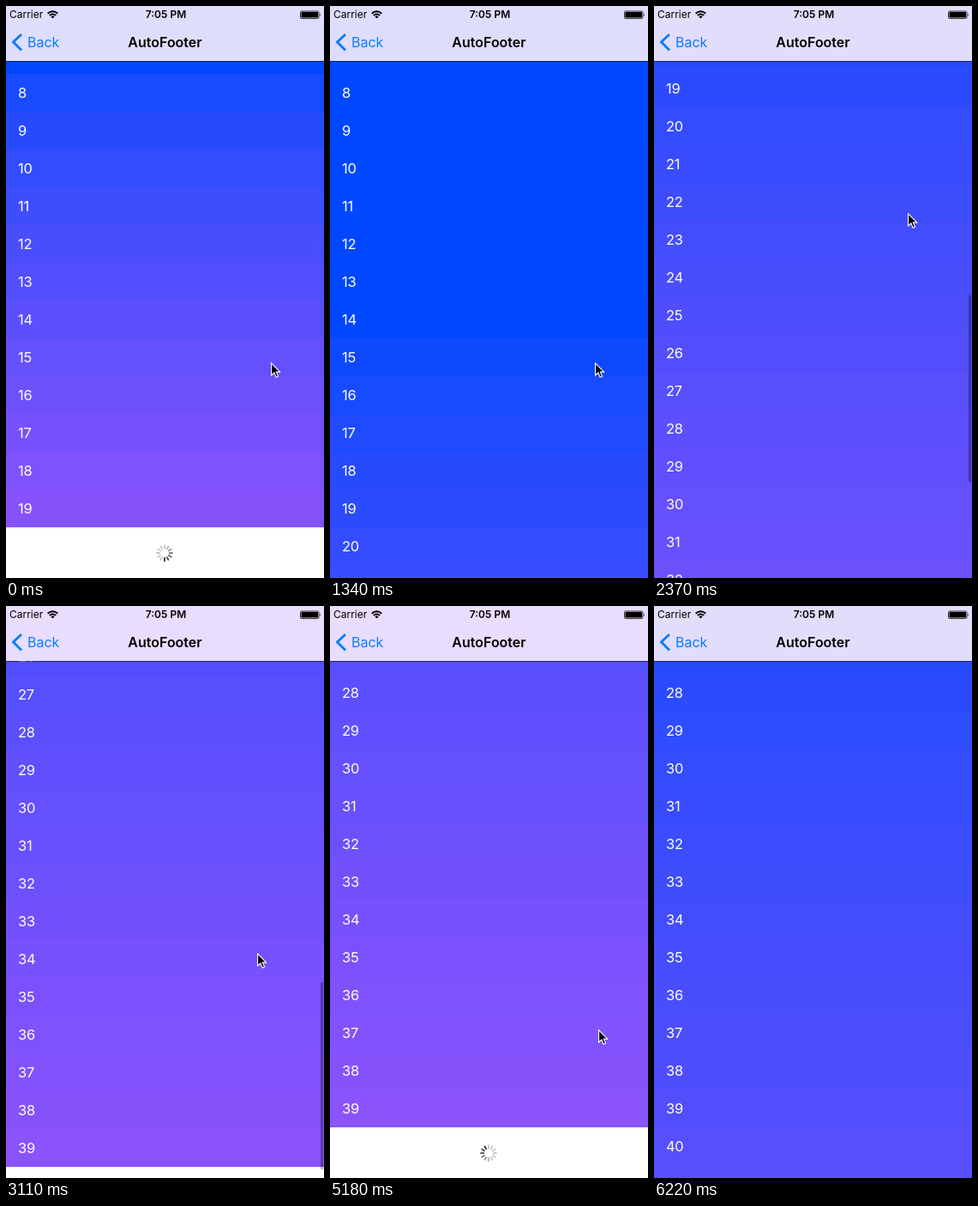
An HTML page for the animation above (6.81 s loop, 371 px wide and 666 px high).

```html
<!DOCTYPE html>
<html lang="en">
<head>
<meta charset="utf-8">
<title>AutoFooter</title>
<style>
  html, body { margin: 0; width: 100%; height: 100%; overflow: hidden; background: #fff; }
  body { position: relative; font-family: Inter, "Liberation Sans", sans-serif; }
  #stage { position: absolute; left: 0; top: 0; width: 371px; height: 666px; overflow: hidden; background: #fff; }
  #list { position: absolute; left: 0; top: 0; width: 100%; }
  .row { height: 44px; line-height: 44px; padding-left: 14px; color: #fff; font-size: 16.5px; letter-spacing: -.3px; }
  #footer { position: relative; height: 60px; background: #fff; }
  #footer svg { position: absolute; left: 175px; top: 20px; }
  #bar { position: absolute; left: 367px; top: 0; width: 3px; border-radius: 2px; background: #000; }
  #nav { position: absolute; left: 0; top: 0; width: 100%; height: 64px; border-bottom: 1px solid rgba(0, 0, 30, .6); background-clip: padding-box; }
  #nav span { position: absolute; white-space: nowrap; line-height: 20px; }
  #nav svg { position: absolute; left: 0; top: 0; }
  .status { top: 0; font-size: 12px; }
  .title { top: 32px; font-size: 16px; }
  .mid { left: 0; width: 371px; text-align: center; font-weight: 600; color: #000; }
  #cursor { position: absolute; left: 0; top: 0; overflow: visible; }
</style>
</head>
<body>
<div id="stage">
  <div id="list">
    <div id="footer">
      <svg width="20" height="20" viewBox="-10 -10 20 20"><g id="spinner" stroke="#222" stroke-width="1.8" stroke-linecap="round"></g></svg>
    </div>
  </div>
  <div id="bar"></div>
  <div id="nav">
    <span class="status" style="left:4px">Carrier</span>
    <span class="status mid" style="left:1px">7:05 PM</span>
    <span class="title" style="left:25px;color:#087dff">Back</span>
    <span class="title mid">AutoFooter</span>
    <svg width="371" height="64" fill="none">
      <path d="M18 33 L8.5 42 L18 51.5" stroke="#087dff" stroke-width="2.9"/>
      <g stroke="#000" stroke-width="1.8">
        <path d="M48.6 8.7 Q54.5 3.9 60.4 8.7"/>
        <path d="M50.8 11 Q54.5 8 58.2 11"/>
      </g>
      <path d="M52.4 12.4 Q54.5 10.8 56.6 12.4 L54.5 14.6 Z" fill="#000"/>
      <rect x="343.5" y="6" width="21.5" height="8.6" rx="1.5" stroke="#000" stroke-width=".8"/>
      <rect x="344.5" y="7" width="19.5" height="6.6" rx=".7" fill="#000"/>
      <path d="M366 8.7 Q367.8 10.3 366 12 Z" fill="#000"/>
    </svg>
  </div>
  <svg id="cursor" width="12" height="19">
    <path d="M.6 .8 V15 L3.9 12 L6.1 17.3 L8.6 16.3 L6.3 11.1 H10.7 Z" fill="#000" stroke="#fff" stroke-width="1.1"/>
  </svg>
</div>
<script>
const $ = id => document.getElementById(id);
const LOOP = 6810, TICK = 148, LAST = 42, ROW = 44;
const TOP = -273, END = -1153;
const MAX_ROWS = 60;

const rows = [];
for (let i = 0; i < MAX_ROWS; i++) {
  const row = document.createElement('div');
  row.className = 'row';
  row.textContent = i;
  $('list').insertBefore(row, $('footer'));
  rows.push(row);
}

const spokes = [];
for (let i = 0; i < 12; i++) {
  const line = document.createElementNS('http://www.w3.org/2000/svg', 'path');
  line.setAttribute('d', 'M0 -5.6 V-9');
  line.setAttribute('transform', `rotate(${i * 30})`);
  $('spinner').appendChild(line);
  spokes.push(line);
}

// Tick, x, y of the pointer
const pointer = [
  [11, 309, 415], [12, 308, 398], [13, 302, 325], [14, 296, 241], [18, 296, 241],
  [21, 293, 404], [27, 300, 393], [35, 313, 493], [36, 317, 507],
  [38, 317, 507], [39, 321, 526], [41, 344, 622], [42, 346, 684]
];

const clamp = (v, lo, hi) => Math.max(lo, Math.min(hi, v));
const shade = part => Math.pow(clamp((part - .35) / .65, 0, 1), .7);

function rowColor(part) {
  const s = shade(part);
  return `rgb(${Math.round(142 * s)},${Math.round(72 + 11 * s)},${Math.round(255 - 3 * s)})`;
}

// Drag, exponential glide, then a small critically damped bounce at the end
function scrollAt(k) {
  if (k < 12) return TOP;
  const drag = 91, glide = 826, tau = .45;
  if (k <= 14) return TOP - drag * Math.pow((k - 11) / 3, 2.2);
  const t = (k - 14) * TICK / 1000;
  const start = TOP - drag, rest = glide - (start - END);
  const hit = tau * Math.log(glide / rest);
  if (t < hit) return start - glide * (1 - Math.exp(-t / tau));
  const s = t - hit;
  return END - rest / tau * s * Math.exp(-s / .1);
}

function pointerAt(k) {
  let a = pointer[0];
  for (const b of pointer) {
    if (k <= b[0]) {
      const f = b === a ? 0 : clamp((k - a[0]) / (b[0] - a[0]), 0, 1);
      return [a[1] + (b[1] - a[1]) * f, a[2] + (b[2] - a[2]) * f];
    }
    a = b;
  }
  return a.slice(1);
}

function drawBar(k, count, y) {
  const small = count > 20;
  const height = small ? 218 : 385;
  const top = small ? 69 + .324 * Math.min(64 - y, 1139) : 279;
  const alpha = k === 0 ? .03 : k < 12 ? 0 : .32 * clamp((27 - k) / 3, 0, 1);
  $('bar').style.cssText = `height:${height}px;opacity:${alpha};transform:translateY(${top}px)`;
}

function draw(k) {
  const count = k < 9 ? 20 : k < 36 ? 40 : 60;
  const y = Math.round(scrollAt(k));
  $('list').style.transform = `translateY(${y}px)`;
  rows.forEach((row, i) => {
    row.style.display = i < count ? '' : 'none';
    row.style.background = rowColor(i / count);
  });

  const tint = shade((32 - y) / ROW / count);
  $('nav').style.backgroundColor = `rgb(${Math.round(223 + 15 * tint)},221,252)`;

  const head = (k < 9 ? 6 : 9) + Math.floor(k * TICK * 12 / 1000);
  spokes.forEach((line, i) => {
    const age = ((head - i) % 12 + 12) % 12;
    line.setAttribute('opacity', Math.max(.26, .95 - age * .12));
  });

  drawBar(k, count, y);
  const [px, py] = pointerAt(k).map(Math.round);
  $('cursor').style.transform = `translate(${px}px,${py}px)`;
}

let shown = -1;
function frame() {
  const t = Math.floor(performance.now() % LOOP / 10) * 10;
  const k = Math.min(LAST, Math.floor(t / TICK));
  if (k !== shown) draw(shown = k);
  requestAnimationFrame(frame);
}
frame();
</script>
</body>
</html>
```
